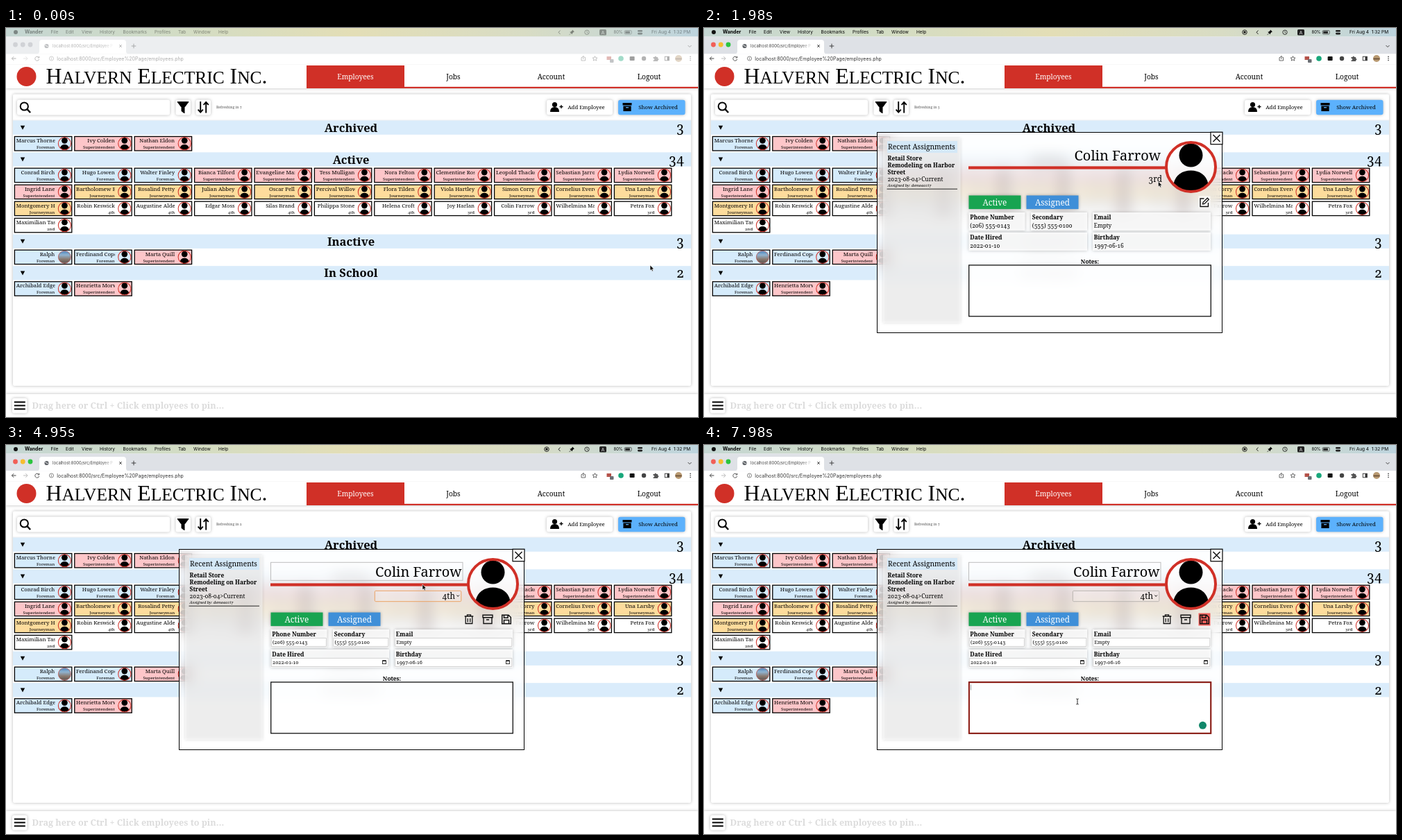
Write an HTML page that moves like this. It is 997 px wide and 561 px high and loops after 8 s.

```html
<!DOCTYPE html>
<html lang="en">
<head>
<meta charset="utf-8">
<title>Employees</title>
<style>
html, body { margin: 0; width: 100%; height: 100%; overflow: hidden; background: #fff; }
#stage { position: relative; width: 997px; height: 561px; overflow: hidden; }
#stage > svg { position: absolute; left: 0; top: 0; }
text { font-family: "Noto Serif", serif; font-variant-numeric: oldstyle-nums; white-space: pre; }
.ui text { font-family: Inter, "Liberation Sans", sans-serif; font-variant-numeric: normal; }
text.logo { font-family: "Liberation Serif", serif; }
.sh { filter: drop-shadow(0 0 2px rgba(0,0,0,.28)); }
#modal {
  position: absolute; left: 249.4px; top: 149.6px; width: 496px; height: 288.6px;
  border: 1.2px solid #000; background: rgba(255,255,255,.66);
  -webkit-backdrop-filter: blur(10px); backdrop-filter: blur(10px);
}
</style>
</head>
<body>
<div id="stage"></div>
<script>
const LOOP = 8000, RED = '#d03027', BLUE = '#daecfb';
const TINT = { Foreman: '#d5ebfb', Superintendent: '#fdc6c9', Journeyman: '#fddc9c' };
const MID = 'text-anchor="middle" ', END = 'text-anchor="end" ', BOLD = 'font-weight="700" ', WHITE = 'fill="#fff" ';

const rect = (x, y, w, h, fill, more = '') =>
  `<rect x="${x}" y="${y}" width="${w}" height="${h}" fill="${fill}" ${more}/>`;
const circ = (x, y, r, fill, more = '') => `<circle cx="${x}" cy="${y}" r="${r}" fill="${fill}" ${more}/>`;
const line = (d, w = 1, color = '#111') => `<path d="${d}" fill="none" stroke="${color}" stroke-width="${w}"/>`;
const shape = (d, fill = '#000', more = '') => `<path d="${d}" fill="${fill}" ${more}/>`;
const text = (x, y, s, size, more = '') => `<text x="${x}" y="${y}" font-size="${size}" ${more}>${s}</text>`;
const group = (id, inner, more = '') => `<g id="${id}" ${more}>${inner}</g>`;
const at = (x, y, inner, k = 1) => `<g transform="translate(${x} ${y}) scale(${k})">${inner}</g>`;
const edge = (color, w = 1) => `stroke="${color}" stroke-width="${w}" `;
const SH = 'class="sh" ';

/* ---------- menu bar and browser ---------- */
const menus = [[64.5, 'File'], [86, 'Edit'], [109, 'View'], [135, 'History'], [168.5, 'Bookmarks'],
  [214, 'Profiles'], [248, 'Tab'], [270, 'Window'], [306, 'Help']];

const menuBar = rect(0, 0, 997, 12.5, 'url(#wall)') +
  group('menu',
    circ(14, 6, 3, '#111') + text(27, 8.4, 'Wander', 6.9, BOLD) +
    menus.map(([x, s]) => text(x, 8.4, s, 6.5)).join('') +
    line('M798.5 3.5l-2.5 2.7l2.5 2.7', .9) +
    shape('M816 2.5l3 3l-1.2 .3l-1.8 2l-.2 1.5l-3.6-3.6l1.5-.2l2-1.8z') + line('M814 7.5l-2.5 2.5', .7) +
    circ(837, 6.2, 3.2, 'none', edge('#111', .8)) + line('M837 4.2v2.2l1.5 1', .7) +
    rect(855, 2, 10, 8.5, '#222', 'rx="1.5"') + text(860, 8.6, 'A', 6.4, MID + 'fill="#eee"') +
    text(875.5, 8.4, '80%', 5.9) +
    rect(891.2, 3.5, 10, 5.4, 'none', 'rx="1.4" ' + edge('#333', .7)) + rect(892.3, 4.6, 6.6, 3.2, '#222') +
    rect(910, 3, 7, 2.6, '#222', 'rx="1.3"') + rect(910, 6.8, 7, 2.6, '#222', 'rx="1.3"') +
    text(986, 8.4, 'Fri Aug 4  1:32 PM', 6.5, END), 'class="ui"') +
  group('rec', circ(779, 6.1, 3.3, 'none', edge('#111', .9)) + rect(777.5, 4.6, 3, 3, '#111', 'rx=".6"'));

const lights = colors => colors.map((c, i) => circ(13.5 + 10.75 * i, 24, 3.4, c)).join('');
const browser = rect(0, 12.5, 997, 25, '#dee1e6') + group('pale', rect(0, 12.5, 997, 25, '#eceef0')) +
  lights(['#d0d2d6', '#d0d2d6', '#d0d2d6']) + group('lights', lights(['#f25f57', '#f6bd2e', '#2bc53f'])) +
  shape('M44 37.5q4 0 4-4V21q0-4 4-4H169q4 0 4 4v12.5q0 4 4 4z', '#fff') +
  rect(0, 37.4, 997, 15.2, '#fff') +
  group('tools',
    circ(58.5, 26, 3.1, '#5f6368') + line('M56 25h2l1 2l2-1', .7, '#fff') +
    text(67, 28, 'localhost:8000/src/Employee P', 5.9, 'fill="url(#fade)"') +
    line('M163.2 24.2l3.6 3.6m0-3.6l-3.6 3.6M184 22.7v6.6m-3.3-3.3h6.6', .9, '#333') +
    line('M982.5 25l2.5 2.5l2.5-2.5', 1, '#444') +
    line('M14.5 44h-6m2.7-2.8l-2.8 2.8l2.8 2.8', 1, '#444') +
    line('M25 44h6m-2.7-2.8l2.8 2.8l-2.8 2.8', 1, '#bbb') +
    line('M47.3 42.5a3 3 0 1 0 .4 2.5M47.8 40.8v2.2h-2.2', .9, '#444') +
    circ(65.5, 44, 3, 'none', edge('#555', .7)) + line('M65.5 43.5v2.2m0-3.6v.7', .7, '#555') +
    text(73.3, 46.5, 'localhost:8000/src/Employee%20Page/employees.php', 7, 'fill="#333"') +
    line('M830.3 42.5h-1.3v4.5h5.6v-4.5h-1.3M831.8 45v-4.5m-1.4 1.3l1.4-1.4l1.4 1.4', .8, '#444') +
    line('M848.5 40.6l1 2.3l2.5 .2l-1.9 1.6l.6 2.4l-2.2-1.3l-2.2 1.3l.6-2.4l-1.9-1.6l2.5-.2z', .8, '#444') +
    rect(865.5, 41, 6.5, 5, '#b5524a') + rect(870, 45, 5.5, 5, '#6b6f74', 'rx="1"') +
    circ(886, 44, 3.8, '#18a77b') + rect(898.6, 41, 7, 6, '#111', 'rx="1"') + circ(919, 44, 3.2, '#444') +
    shape('M932.5 42h2a1.3 1.3 0 1 1 2.6 0h2v2a1.3 1.3 0 1 1 0 2.6v1.4h-6.6v-1.5a1.3 1.3 0 1 0 0-2.5z', '#555') +
    rect(949.3, 41.2, 6, 5.6, 'none', edge('#333', .9)) + rect(952.5, 41.2, 2.8, 5.6, '#333') +
    circ(969, 44, 5, '#b99a72') + rect(964.5, 43.6, 9, 1.8, '#6d5138') +
    [41.4, 44, 46.6].map(y => circ(986, y, .8, '#333')).join(''), 'class="ui"');

/* ---------- page header and toolbar ---------- */
const smallCaps = (s, size) => s.replace(/[a-z]+/g, w => `<tspan font-size="${size * .8}">${w.toUpperCase()}</tspan>`);

const person = circ(0, -4, 3.6, '#000') + shape('M-6.5 6.5q0-7 6.5-7t6.5 7z');
const box = shape('M-6.5-6h13v3.6h-13zM-5.6-1.6h11.2v7.6h-11.2z') + line('M-2 .7h4', 1.3, '#5cb1fc');

const header = rect(0, 52.5, 997, 34.5, '#fff', SH) +
  circ(29.5, 70, 14, RED) +
  text(57.5, 79.8, smallCaps('Halvern Electric Inc.', 31.8), 31.8, 'class="logo"') +
  rect(433, 84.8, 564, 2.2, RED) + rect(433, 54, 141, 32, RED) +
  text(503.5, 73.6, 'Employees', 10.2, MID + WHITE) +
  [[644.5, 'Jobs'], [785.5, 'Account'], [926.5, 'Logout']].map(([x, s]) => text(x, 73.6, s, 10.2, MID)).join('');

const toolbar = rect(10, 95.5, 977, 420.5, '#fff', 'rx="2" ' + SH) +
  rect(10, 132.6, 977, 1, '#e6e9ec') +
  rect(16, 103.5, 220, 22, '#fff', 'rx="3" ' + SH) +
  circ(26.3, 113, 5.6, 'none', edge('#000', 2)) + line('M30.5 117.2l4.6 4.8', 2.4, '#000') +
  rect(244.5, 103.5, 21.5, 22, '#fff', 'rx="3" ' + SH) +
  shape('M247 106.5h16l-6 8v8.3l-4-3v-5.3z', '#000', 'stroke="#000" stroke-linejoin="round"') +
  rect(273.5, 103.5, 21.5, 22, '#fff', 'rx="3" ' + SH) +
  line('M280.2 106v15.5m-3.6-3.8l3.6 3.8l3.6-3.8M288.2 122.500v-15.5m-3.600 3.800l3.600-3.800l3.600 3.800', 1.9, '#000') +
  text(303, 116.2, 'Refreshing in <tspan id="count"></tspan>', 5.1, 'fill="#555"') +
  rect(779, 103.8, 95, 21.5, '#fff', 'rx="3" ' + SH) + at(790.5, 114.5, person) +
  line('M797.500 113.500h5m-2.500-2.500v5', 1.3, '#000') +
  text(836, 117.2, 'Add Employee', 7.8, MID) +
  rect(882, 103.8, 96.5, 21.5, '#5cb1fc', 'rx="3" ' + SH) + at(895, 114, box) +
  text(939.5, 117.2, 'Show Archived', 7.8, MID);

const footer = rect(0, 528, 997, 33, '#fff', SH) + rect(9, 534, 21.5, 21.5, '#fff', 'rx="3" ' + SH) +
  line('M11.800 539.500h16m-16 5h16m-16 5h16', 2, '#000') +
  text(37.5, 549, 'Drag here or Ctrl + Click employees to pin…', 12.6, BOLD + 'fill="#dcdcdc"');

/* ---------- employee cards ---------- */
const avatar = (x, y, k) => at(x, y,
  circ(0, -17, 17, '#000') +
  shape('M-25 24C-22 11 -12 5 0 5S22 11 25 24A34.6 34.6 0 0 1 -25 24Z') +
  circ(0, 0, 35.5, 'none', edge(RED, 4)), k);
const photo = (x, y) => circ(x, y, 9, 'url(#sky)', edge('#b9544c', .8));

function card(col, y, name, role, icon = avatar) {
  const x = 12.4 + 86.4 * col;
  return rect(x, y, 82.4, 20.4, TINT[role] || '#fff', edge('#000', 1.3) + `data-name="${name}"`) +
    `<svg x="${x + 2.3}" y="${y}" width="55.8" height="20">` +
    text(55.6, 8.6, name, 7.78, END + 'class="name"') + text(55.6, 17.5, role, 6.15, END) + '</svg>' +
    icon(x + 72, y + 10.2, .256);
}
const row = (y, names, role) => names.split(', ').map((n, i) => card(i, y, n, role(i))).join('');
const section = (y, title, count) => rect(10, y, 977, 20.3, BLUE) +
  shape(`M20.8 ${y + 7.2}h6.4l-3.2 6z`) +
  text(497, y + 16.2, title, 16.5, MID + BOLD) + text(977, y + 16.4, count, 19, END);

const people =
  section(133.5, 'Archived', 3) +
  row(156.5, 'Marcus Thorne, Ivy Colden, Nathan Eldon', i => i ? 'Superintendent' : 'Foreman') +
  section(179.3, 'Active', 34) +
  row(202.2, 'Conrad Birch, Hugo Lowen, Walter Finley, Bianca Tilford, Evangeline Marsden, Tess Mulligan, ' +
    'Nora Felton, Clementine Rosewood, Leopold Thackery, Sebastian Jarrold, Lydia Norwell',
    i => i < 3 ? 'Foreman' : 'Superintendent') +
  row(226.2, 'Ingrid Lane, Bartholomew Benfield, Rosalind Petty, Julian Abbey, Oscar Pell, Percival Willowby, ' +
    'Flora Tilden, Viola Hartley, Simon Corry, Cornelius Everdale, Una Larsby',
    i => i ? 'Journeyman' : 'Superintendent') +
  row(250.2, 'Montgomery Hernshaw, Robin Keswick, Augustine Alderway, Edgar Moss, Silas Brand, Philippa Stone, ' +
    'Helena Croft, Joy Harlan, Colin Farrow, Wilhelmina Martlow, Petra Fox',
    i => i ? i < 7 ? '4th' : '3rd' : 'Journeyman') +
  row(274.4, 'Maximilian Tasker', () => '2nd') +
  section(297.6, 'Inactive', 3) +
  card(0, 320.2, 'Ralph', 'Foreman', photo) + card(1, 320.2, 'Ferdinand Copeland', 'Foreman') +
  card(2, 320.2, 'Marta Quill', 'Superintendent') +
  section(343.2, 'In School', 2) +
  row(365.8, 'Archibald Edgerton, Henrietta Morwick', i => i ? 'Superintendent' : 'Foreman');

/* ---------- detail window ---------- */
const fields = [
  [381.5, 266, 81, 'Phone Number', '(206) 555-0143'], [471, 266, 81, 'Secondary', '(555) 555-0100'],
  [560, 266, 170, 'Email', 'Empty'], [381.5, 295, 170.5, 'Date Hired', '2022-01-10', 1],
  [560, 295, 170, 'Birthday', '1997-06-16', 1]];
const calendar = (x, y) => rect(x - 2.5, y - 2, 5, 4.6, 'none', edge('#222', .9)) + rect(x - 2.5, y - 2.6, 5, 1.6, '#222');
const fieldBox = ([x, y, w, label]) => rect(x, y, w, 26, 'rgba(255,255,255,.85)', SH) +
  text(x + 1.8, y + 10.3, label, 8.4, BOLD);
const fieldView = ([x, y, , , value]) => text(x + 1.8, y + 22.4, value, 8.2);
const fieldEdit = ([x, y, w, , value, date]) =>
  rect(x + .8, y + 12.6, w - 2, 11.8, '#fff', edge('#c9c9c9', .8)) +
  text(x + 2.5, y + 21, value, 7.15) + (date ? calendar(x + w - 7, y + 18) : '');

const pencil = line('M-.500-5.500h-5.500v11.500h11.500v-5.500', 1.4) + line('M-2.500 2.500l.6-2.600l6.200-6.200l2 2l-6.200 6.200z', 1.3);
const trash = line('M-6.300-4.500h12.600M-2.500-5v-1.700h5v1.700M-4.800-4v10h9.600v-10M-1.700-1.500v5.500m3.400-5.500v5.500', 1.3);
const crate = line('M-7-6.300h14v3.600h-14zM-6-2.500v8.500h12v-8.500M-2 .500h4', 1.4);
const disk = line('M-6.300-6.300h9.300l3.300 3.300v9.300h-12.600zM-3.500-6v3.800h5.500v-3.800M-3.500 6v-5h7v5', 1.5);
const button = (x, label, color) => rect(x, 241.5, 75, 19.6, color, SH) + text(x + 37.5, 255.5, label, 11.75, MID + WHITE);

const detail =
  rect(258, 159, 111.5, 266, 'rgba(255,255,255,.5)', SH) +
  rect(264, 163, 101, 17, '#d4e8f7') + text(313.5, 175.3, 'Recent Assignments', 10.2, MID) +
  ['Retail Store', 'Remodeling on Harbor', 'Street'].map((s, i) => text(264.5, 191.2 + 10 * i, s, 8.4, BOLD)).join('') +
  text(264.5, 221.2, '2023-08-04&gt;Current', 8.4) +
  text(264.5, 229, 'Assigned by: demoacct7', 5.7, 'font-style="italic"') + line('M263.500 232.200h101.500', .9) +
  rect(381, 199.4, 286, 4.2, RED) + circ(701.5, 200.5, 36, '#fff', 'fill-opacity=".7"') + avatar(701.5, 200.5, 1) +
  rect(730, 150.2, 17, 17.5, '#fff', edge('#000', 1.2)) + line('M733.500 154l10 10m0-10l-10 10', 1.5) +
  button(381.5, 'Active', '#18a451') + button(464.5, 'Assigned', '#3f8fd8') +
  fields.map(fieldBox).join('') +
  text(556, 339.5, 'Notes:', 8.3, MID + BOLD) +
  rect(381.7, 342, 348.6, 73.8, 'rgba(255,255,255,.75)', edge('#111', 1.3)) +
  group('view',
    text(658, 190.6, 'Colin Farrow', 20, END) + text(660, 221.6, '3rd', 11.7, END) +
    rect(712.5, 242.500, 17, 17, '#fff', 'fill-opacity=".7"') + at(721, 251.5, pencil) + fields.map(fieldView).join('')) +
  group('edit',
    rect(381.5, 169.3, 276.5, 26, 'rgba(255,255,255,.3)', edge('#bdbdbd')) + text(656.5, 189.6, 'Colin Farrow', 20, END) +
    rect(531.3, 210.3, 124.5, 15.4, 'rgba(255,255,255,.15)', 'id="select" rx="1.5"') +
    text(647, 221.8, '', 11.8, END + 'id="grade"') + line('M649.500 216.500l1.700 1.900l1.700-1.900', 1) +
    at(667, 251.5, trash) + at(694, 251.5, crate) +
    rect(712.5, 242.5, 17, 18, '#f0605c', 'id="pulse"') + at(721, 251.5, disk) + fields.map(fieldEdit).join('')) +
  group('notes', rect(381.9, 342.2, 348.4, 73.6, 'none', edge('#8e1a12', 2)) +
    group('caret', rect(384, 345.5, .7, 8, '#777')));

/* ---------- grade list and pointers ---------- */
const grades = ['Foreman', 'Superintendent', 'Journeyman', '4th', '3rd', '2nd', '1st'];
const STEP = 18.7, itemY = i => 145 + STEP * i;
const list = rect(527, 132.5, 124.5, 137.5, '#ebebea', 'rx="4" fill-opacity=".97" ' + SH) +
  rect(529.3, 0, 120, STEP, '#f58f3e', 'id="mark" rx="2.500"') +
  grades.map((s, i) => text(539, itemY(i) + 4, s, 11.6, 'class="item"')).join('') +
  line(`M531.500 ${itemY(4) + .5}l1.700 2l3-4`, 1, '#fff');

const arrow = shape('M0 0v7.800l1.800-1.600l1.200 2.700l1.400-.6l-1.200-2.600h2.400z', '#000', edge('#fff', .6));
const beam = line('M-1.700-4q1.700 0 1.700 1q0-1 1.700-1M0-3v6M-1.700 4q1.700 0 1.700-1q0 1 1.700 1', .9);

/* ---------- assembly ---------- */
const stops = (...colors) => colors.map((c, i) => `<stop offset="${i / (colors.length - 1)}" stop-color="${c}"/>`).join('');
const defs = '<defs>' +
  `<linearGradient id="wall">${stops('#c4d6d3', '#d2dcc4', '#e3deb6', '#d8dcc4', '#bdd4de')}</linearGradient>` +
  `<linearGradient id="fade" gradientUnits="userSpaceOnUse" x1="138" x2="157">${stops('#444', '#fff')}</linearGradient>` +
  `<linearGradient id="sky" x2="0" y2="1">${stops('#4d86bd', '#8fb2cf', '#8a7a70', '#5b5350')}</linearGradient></defs>`;
const sheet = inner => `<svg width="997" height="561" viewBox="0 0 997 561">${inner}</svg>`;

document.getElementById('stage').innerHTML =
  sheet(defs + header + toolbar + people + footer + menuBar + browser) +
  '<div id="modal"></div>' +
  sheet(group('detail', detail) + group('list', list, 'class="ui"') +
    group('badge', circ(718.5, 404.3, 5.5, '#11876a')) + group('arrow', arrow) + group('beam', beam));

const $ = id => document.getElementById(id);
const show = (id, on) => { $(id).style.display = on ? '' : 'none'; };
const fade = (id, k) => { $(id).style.opacity = k; };
const clamp = k => Math.max(0, Math.min(1, k));

// Names too long for their card are cut off at the right.
document.querySelectorAll('.name').forEach(el => {
  if (el.getComputedTextLength() > 56) {
    el.setAttribute('x', 0);
    el.setAttribute('text-anchor', 'start');
  }
});

/* ---------- motion ---------- */
const OPEN = 1440, EDIT = 2500, DROP = 3600, PICK = 4900, FOCUS = 6800;
const path = [[380, 928, 342], [1140, 738, 259], [1480, 738, 259], [1960, 654, 221], [2400, 721, 251],
  [2560, 721, 251], [3060, 637, 216], [3660, 637, 216], [4020, 624, 209], [4300, 622, 209], [4700, 600, 201],
  [4950, 600, 201], [5660, 581, 286], [6000, 581, 286], [6600, 538, 370], [LOOP, 538, 370]];

function pointer(t) {
  const i = path.findIndex(p => t < p[0]);
  if (i < 1) return path[0].slice(1);
  const a = path[i - 1], b = path[i];
  const k = (t - a[0]) / (b[0] - a[0]), e = k * k * (3 - 2 * k);
  return [a[1] + (b[1] - a[1]) * e, a[2] + (b[2] - a[2]) * e];
}

const hovered = document.querySelector('[data-name="Colin Farrow"]');
const items = document.querySelectorAll('.item');

function draw(t) {
  const wake = clamp((t - 20) / 220);
  ['menu', 'tools'].forEach(id => fade(id, .4 + .6 * wake));
  ['rec', 'lights'].forEach(id => fade(id, wake));
  fade('pale', 1 - wake);

  const sec = Math.floor((t - 700) / 1000);
  $('count').textContent = sec < 5 ? 6 - sec : 14 - sec;

  const [x, y] = pointer(t), open = t >= OPEN, edit = t >= EDIT;
  hovered.setAttribute('fill', !open && Math.abs(x - 744) < 41 && y < 271 ? '#dde3e2' : '#fff');
  show('modal', open);
  show('detail', open);
  show('view', !edit);
  show('edit', edit);

  const picked = t >= PICK, mark = t < 4400 ? 4 : 3;
  show('list', t >= DROP && !picked);
  $('mark').setAttribute('y', itemY(mark) - STEP / 2);
  items.forEach((el, i) => el.setAttribute('fill', i === mark ? '#fff' : '#222'));
  $('grade').textContent = picked ? '4th' : '3rd';
  $('select').setAttribute('stroke', picked && t < FOCUS ? '#eba263' : '#b9b4b0');

  const beat = Math.abs((t - 60) % 2000 - 1000);
  fade('pulse', clamp((beat - 650) / 250));

  show('notes', t >= FOCUS);
  show('caret', (t - FOCUS) % 1000 < 500);
  show('badge', t >= FOCUS + 250);

  const typing = (t > 5450 && y > 277 && y < 291) || y > 342 && open;
  show('arrow', !typing);
  show('beam', typing);
  [$('arrow'), $('beam')].forEach(el => el.setAttribute('transform', `translate(${x} ${y})`));
}

const start = performance.now();
function tick() {
  draw((performance.now() - start) % LOOP);
  requestAnimationFrame(tick);
}
tick();
</script>
</body>
</html>
```
